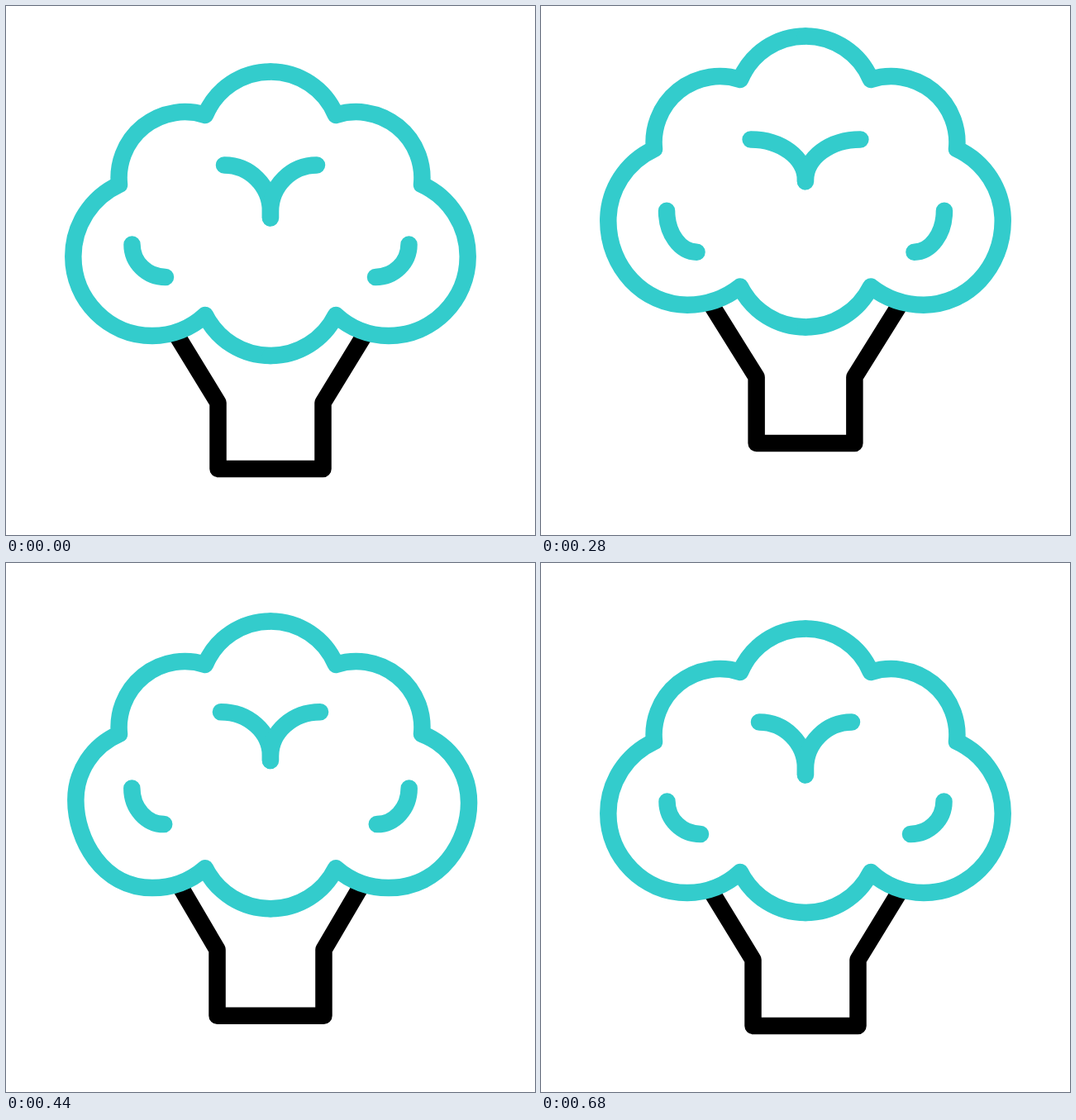
An HTML page that plays this animation: 640 by 640 pixels, repeating every 1.48 s.

```html
<!DOCTYPE html>
<html lang="en">
<head>
<meta charset="utf-8">
<title>Bouncing broccoli</title>
<style>
  html, body { margin: 0; width: 100%; height: 100%; overflow: hidden; background: #fff; }
  svg { display: block; width: 100vw; height: 100vh; }
  path { fill: none; stroke: #3cc; stroke-width: 20.5; stroke-linecap: round; stroke-linejoin: round; }
  .stem { stroke: #000; stroke-linecap: butt; }
  .cloud { fill: #fff; }
</style>
</head>
<body>
<svg viewBox="0 0 640 640">
  <g id="left">
    <path class="stem"/><path class="cloud"/><path class="marks"/>
  </g>
  <g id="right" transform="matrix(-1 0 0 1 640 0)">
    <path class="stem"/><path class="cloud"/><path class="marks"/>
  </g>
</svg>
<script>
  const LOOP = 1480, STEP = 40;
  const RISE = 120, TOP = 320, LAND = 520, REST = 680;
  let up = 0, down = 0; // weights of the top pose and the landing pose

  // A key point at rest, with its offsets in the top and landing poses.
  const key = (x, y, hx, hy, lx = 0, ly = 0) =>
    [x + up * hx + down * lx, y + up * hy + down * ly];
  const crown = (x, y) => key(x, y, 0, -48, 0, 12);
  const base = (x, y) => key(x, y, 0, -38.5, 0, 13.5);

  const arc = (r, to) => `A${r} ${r} 0 0 1 ${to}`;
  const quarter = (from, to, sweep) =>
    `M${from}A${to[0] - from[0]} ${to[1] - from[1]} 0 0 ${sweep} ${to}`;
  // Radius of the circle through a and b whose tangent at one end lies on an axis.
  const radius = (a, b, axis) =>
    Math.hypot(a[0] - b[0], a[1] - b[1]) ** 2 / (2 * Math.abs(a[axis] - b[axis]));

  function cloud(sagX, sagY) {
    const notch = base(241, 374), belly = key(177, 399, 0, -41.7, 0, 13.5);
    const side = key(81.3, 303, 0, -48, sagX, sagY);
    const shoulder = crown(137, 216), neck = crown(241, 132);
    const w = belly[0] - side[0], h = belly[1] - side[1], sag = 0.16 * down;
    const c1 = [belly[0] - w * (0.552 + sag), belly[1]];
    const c2 = [side[0], side[1] + h * (0.552 - sag)];
    return `M${base(320, 423)}` + arc(88.2, notch) +
      arc(radius(notch, belly, 1), belly) + `C${c1} ${c2} ${side}` +
      arc(radius(side, shoulder, 0), shoulder) +
      arc(79.8, neck) + arc(85.7, crown(320, 79.5));
  }

  function stem() {
    const [x, y] = key(256.5, 480, 4.6, -34.7, -4);
    return `M${key(204, 394.2, 0, -40.2, 2, 3.3)}L${x} ${y}v80H320`;
  }

  function marks() {
    const leaf = quarter(key(264, 192.5, -11.6, -34.7), key(320, 248.5, 0, -42), 1);
    const dimple = quarter(key(152.5, 288.5, -0.5, -45.5), key(193, 328, -5, -33.8), 0);
    return leaf + `L${key(320, 256.4, 0, -49.2)}` + dimple;
  }

  const put = (path, d) => document.querySelector(path).setAttribute('d', d);
  function half(id, sagX, sagY) {
    put(`#${id} .stem`, stem());
    put(`#${id} .cloud`, cloud(sagX, sagY));
    put(`#${id} .marks`, marks());
  }

  const ease = (t, a, b) => {
    const x = Math.min(1, Math.max(0, (t - a) / (b - a)));
    return x * x * (3 - 2 * x);
  };

  function draw(t) {
    const fall = ease(t, TOP, LAND);
    up = ease(t, RISE, TOP) - fall;
    down = fall - ease(t, LAND, REST);
    half('left', 4.7, 1);
    half('right', -2.1, 6);
  }

  let start;
  function tick(now) {
    start ??= now;
    const t = (now - start) % LOOP;
    draw(Math.floor(t / STEP) * STEP);
    requestAnimationFrame(tick);
  }
  draw(0);
  requestAnimationFrame(tick);
</script>
</body>
</html>
```
